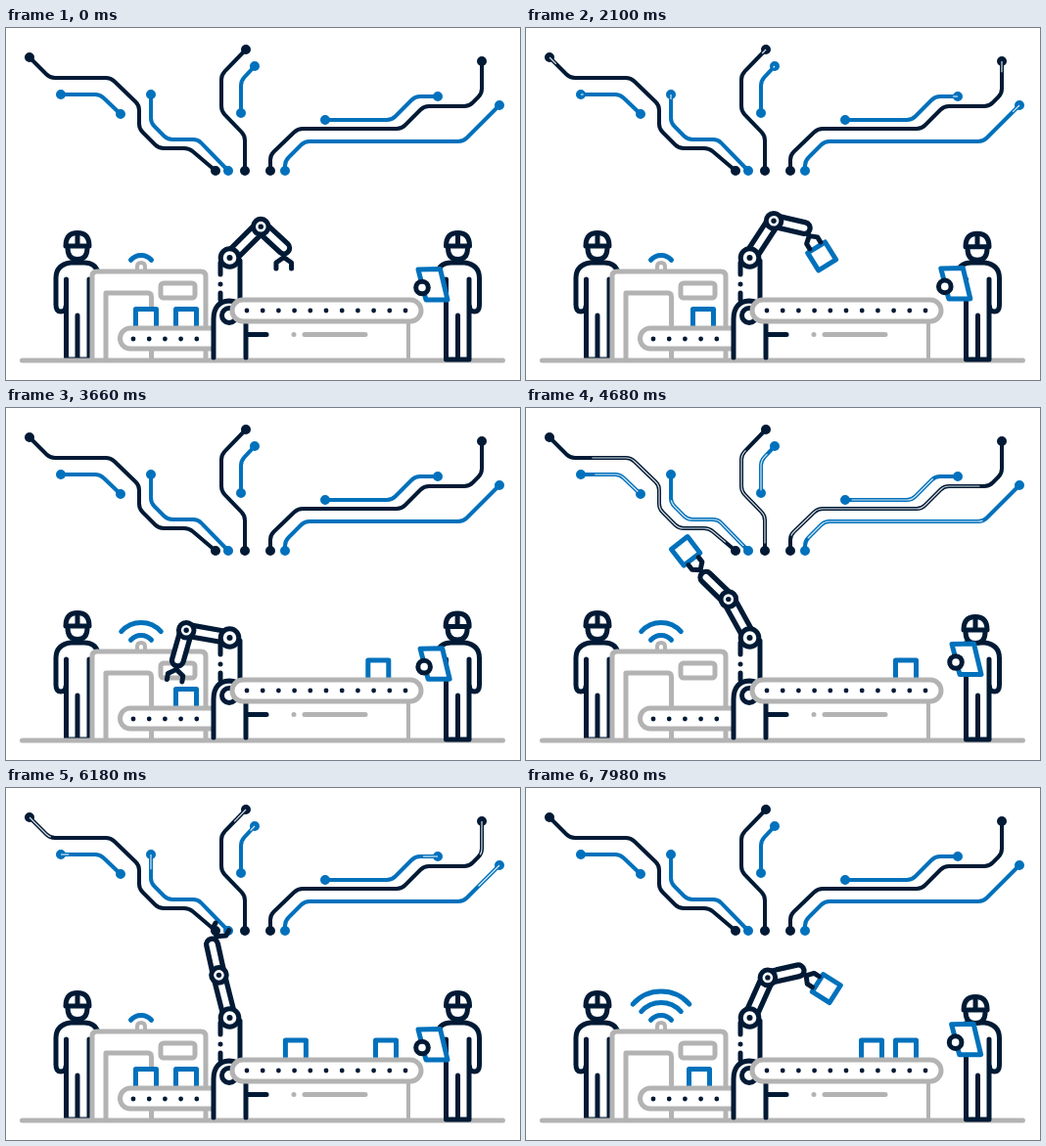
Recreate the animation shown at these times as an HTML page. Size 525 by 360 pixels, loop 8 s.

```html
<!DOCTYPE html>
<html lang="en">
<head>
<meta charset="utf-8">
<title>Robot assembly line</title>
<style>
  html, body { margin: 0; width: 100%; height: 100%; overflow: hidden; background: #fff; }
  svg { display: block; width: 525px; height: 360px; }
  .line { fill: none; stroke-width: 5; stroke-linecap: round; stroke-linejoin: round; }
  .solid { fill: #fff; }
  .dark { stroke: #001a35; }
  .blue { stroke: #0071bc; }
  .gray { stroke: #b3b3b3; }
  .dot { fill: #001a35; stroke: none; }
  .trace { stroke-width: 4; }
  .flow { fill: none; stroke: #fff; stroke-width: 1.2; stroke-opacity: .85; }
  .bone { stroke: #001a35; stroke-width: 17; stroke-linecap: round; }
  .hollow { stroke: #fff; stroke-width: 6.5; stroke-linecap: round; }
</style>
</head>
<body>
<svg viewBox="0 0 525 360">
  <defs>
    <clipPath id="outlet"><rect x="105" width="420" height="360"/></clipPath>
    <g id="body" class="line dark">
      <path d="M66 240Q51 242 51 256V283Q51 290 56 290Q61 290 61 285M66 240H80Q91 240 94 250"/>
      <path d="M61.500 257V339H85V257M73 294V338"/>
    </g>
    <g id="head" class="line dark">
      <path class="solid" d="M63 225Q63 236.500 73 236.500T83 225"/>
      <path class="solid" d="M61 223Q61 209.500 73 209.500T85 223Z"/>
      <path d="M73 211V222"/>
    </g>
  </defs>

  <g id="circuits"></g>

  <use href="#body"/>
  <use href="#head"/>

  <g class="line gray">
    <path class="solid" d="M88 338V254Q88 249 93 249H199Q204 249 204 254V338"/>
    <path d="M102 338V271H145Q148.500 271 148.500 275V338"/>
    <rect x="158" y="261" width="35" height="15" rx="3"/>
    <path d="M134 247V244Q134 240 138 240T142 244V247" stroke-width="4"/>
    <path d="M411 302V338" stroke-width="4"/>
    <path d="M294 313.500h.01M305 313.500H367"/>
  </g>
  <g id="signal" class="line blue"></g>
  <g id="boxes" class="line blue" clip-path="url(#outlet)"></g>

  <path class="line gray solid" d="M214 307H127A10.500 10.500 0 0 0 127 328H214"/>
  <g id="leftRollers" class="dot"></g>
  <path class="line gray" d="M16.500 340H507.500"/>

  <g transform="matrix(-1 0 0 1 534.500 0)">
    <use href="#body"/>
    <use href="#head" id="rightHead"/>
  </g>
  <g id="tablet" class="line">
    <path class="blue solid" d="M421 247L443.500 246.500L451 278L429 278Z"/>
    <circle class="dark solid" cx="425" cy="265.500" r="6.300"/>
  </g>

  <g class="line dark">
    <path d="M246 313.500H266"/>
    <path class="solid" d="M219 278V240H239V278" stroke="none"/>
    <path d="M239 238V277M219 240V252M219 262h.01M219 271V278"/>
    <path class="solid" d="M212 337V298Q212 280 228 279Q245 280 245 298V337"/>
    <circle cx="228" cy="294" r="7.500"/>
  </g>
  <rect class="line gray solid" x="231" y="278" width="193" height="22" rx="11"/>
  <g id="rightRollers" class="dot"></g>

  <g id="arm">
    <path id="claw" class="line dark"/>
    <line id="foreBone" class="bone"/><line id="foreHollow" class="hollow"/>
    <line id="upperBone" class="bone"/><line id="upperHollow" class="hollow"/>
    <g id="elbow"><circle class="line dark solid" r="7.800"/><circle class="dot" r="2.700"/></g>
    <g transform="translate(228.500 235)"><circle class="line dark solid" r="9.300"/><circle class="dot" r="3"/></g>
  </g>
</svg>
<script>
const $ = id => document.getElementById(id);
const LOOP = 8000, CYCLE = 3000;
const SHOULDER = [228.5, 235], UPPER = 45, FORE = 32, GRIP = 34;
const GRAB = 1080, DROP = 2580;

// Polyline with its corners rounded
function roundedPath(points, radius = 5) {
  const toward = ([x, y], [u, v]) => {
    const k = radius / Math.hypot(u - x, v - y);
    return [x + (u - x) * k, y + (v - y) * k];
  };
  const corners = points.slice(1, -1).map((point, i) =>
    `L${toward(point, points[i])}Q${point} ${toward(point, points[i + 2])}`);
  return `M${points[0]}${corners.join('')}L${points.at(-1)}`;
}

const traces = [
  ['dark', '24,30 45,51 107,51 136,79 136,103 156,123 187,123 214,146'],
  ['blue', '56,68 96,68 117,88'],
  ['blue', '148,68 148,97 165,114 196,114 227,146'],
  ['dark', '245,22 220,48 220,85 244,110 244,146'],
  ['blue', '254,39 240,54 240,87'],
  ['dark', '486,34 486,67 473,80 427,80 404,103 298,103 270,130 270,146'],
  ['blue', '441,70 418,70 394,94 326,94'],
  ['blue', '504,79 467,116 305,116 285,136 285,146']
];
$('circuits').innerHTML = traces.map(([color, text]) => {
  const points = text.split(' ').map(pair => pair.split(',').map(Number));
  const d = roundedPath(points);
  const dots = [points[0], points.at(-1)].map(([x, y]) =>
    `<circle class="${color}" cx="${x}" cy="${y}" r="2.5" stroke-width="5"/>`).join('');
  return `<path class="line trace ${color}" d="${d}"/>${dots}
    <path class="flow" pathLength="1" d="${d}"/>`;
}).join('');
const flows = document.querySelectorAll('.flow');

$('signal').innerHTML = [14, 27, 38.5].map(r => {
  const dx = r * 0.75, y = 246.5 - r * 0.66;
  return `<path d="M${138 - dx} ${y}A${r} ${r} 0 0 1 ${138 + dx} ${y}"/>`;
}).join('');
const arcs = $('signal').children;

const rollers = (x, y, gap, count) => Array.from({ length: count }, (_, i) =>
  `<circle cx="${x + i * gap}" cy="${y}" r="2.4"/>`).join('');
$('leftRollers').innerHTML = rollers(130, 318, 16.2, 5);
$('rightRollers').innerHTML = rollers(246, 289, 16.2, 11);

$('boxes').innerHTML = '<rect class="solid" x="-10.5" y="-10.5" width="21" height="21"/>'.repeat(4);
const boxes = $('boxes').children;

const ease = (t, start, duration) => {
  const u = Math.min(1, Math.max(0, (t - start) / duration));
  return (1 - Math.cos(Math.PI * u)) / 2;
};

// time in the cycle, then upper arm, forearm and claw directions in degrees
const poses = [
  [0, -45, 43, 90],
  [180, -104, -102, -60],
  [660, -170, -254, -261],
  [900, -175, -270, -270],
  [1120, -175, -270, -270],
  [1680, -119, -136, -128],
  [1980, -66, -13, 32],
  [2100, -57, 13, 58],
  [2450, -40, 54, 90],
  [2650, -40, 54, 90]
];
const poseAt = i => {
  const n = poses.length, [time, ...angles] = poses[(i + n) % n];
  return [time + Math.floor(i / n) * CYCLE, ...angles];
};

// Monotone cubic through the poses
function angleAt(p, joint) {
  let i = poses.length - 1;
  while (poses[i][0] > p) i--;
  const slope = k => {
    const a = poseAt(k), b = poseAt(k + 1);
    return (b[joint] - a[joint]) / (b[0] - a[0]);
  };
  const tangent = k => {
    const a = slope(k - 1), b = slope(k);
    return a * b > 0 ? 2 * a * b / (a + b) : 0;
  };
  const from = poseAt(i), to = poseAt(i + 1), span = to[0] - from[0];
  const u = (p - from[0]) / span, v = 1 - u;
  return from[joint] * v * v * (1 + 2 * u) + to[joint] * u * u * (3 - 2 * u)
    + span * u * v * (tangent(i) * v - tangent(i + 1) * u);
}

const reach = ([x, y], degrees, length) => {
  const a = degrees * Math.PI / 180;
  return [x + length * Math.cos(a), y + length * Math.sin(a)];
};

function drawBone(name, [x1, y1], [x2, y2]) {
  for (const part of ['Bone', 'Hollow'])
    for (const [key, value] of Object.entries({ x1, y1, x2, y2 }))
      $(name + part).setAttribute(key, value);
}

function drawArm(p) {
  const [upper, fore, claw] = [1, 2, 3].map(joint => angleAt(p, joint));
  const elbow = reach(SHOULDER, upper, UPPER);
  const wrist = reach(elbow, fore, FORE);
  drawBone('upper', SHOULDER, elbow);
  drawBone('fore', elbow, wrist);
  $('elbow').setAttribute('transform', `translate(${elbow})`);
  const s = 7.8 - 1.3 * (ease(p, 900, 150) - ease(p, DROP, 120));
  $('claw').setAttribute('d', `M4 0H9.500M21 ${-s}L15 ${-s}L9.500 0L15 ${s}L21 ${s}`);
  $('claw').setAttribute('transform', `translate(${wrist}) rotate(${claw})`);
  return [...reach(wrist, claw, GRIP), claw];
}

function waitingX(i, t) {
  const advance = 41 * ease(t, (i - 1) * CYCLE + 1070, 1250);
  const arrival = i < 2 ? 0 : 100 * (1 - ease(t, 4900, 1000));
  return (i % 2 ? 143 + advance : 184) - arrival;
}

function drawBoxes(t, held) {
  [...boxes].forEach((box, i) => {
    const start = i * CYCLE;
    let x, y, angle = 0;
    if (t < start + GRAB) {
      [x, y] = [waitingX(i, t), 298];
    } else if (t < start + DROP) {
      [x, y, angle] = held;
    } else {
      const [stop, duration] = i ? [353, 620] : [388, 800];
      [x, y] = [282 + (stop - 282) * ease(t, start + CYCLE, duration), 268.5];
    }
    box.setAttribute('transform', `translate(${x} ${y}) rotate(${angle})`);
  });
}

function draw(now) {
  const t = now % LOOP, p = t % CYCLE;
  drawBoxes(t, drawArm(p));

  const lift = ease(p, 600, 240) - ease(p, 1960, 200);
  $('tablet').setAttribute('transform', `translate(${14 * lift} ${-5.5 * lift})`);
  $('rightHead').setAttribute('transform', `translate(${2.5 * lift} ${4 * lift})`);

  const wave = t % 1000;
  arcs[1].style.display = wave < 350 ? 'none' : '';
  arcs[2].style.display = wave < 700 ? 'none' : '';

  const pulse = t % 2000;
  const head = ease(pulse, 0, 800), tail = ease(pulse, 500, 600);
  flows.forEach(flow => {
    flow.style.display = head - tail < 0.002 ? 'none' : '';
    flow.setAttribute('stroke-dasharray', `0 ${tail} ${head - tail} 2`);
  });
}

const began = performance.now();
function tick() {
  draw(performance.now() - began);
  requestAnimationFrame(tick);
}
tick();
</script>
</body>
</html>
```
